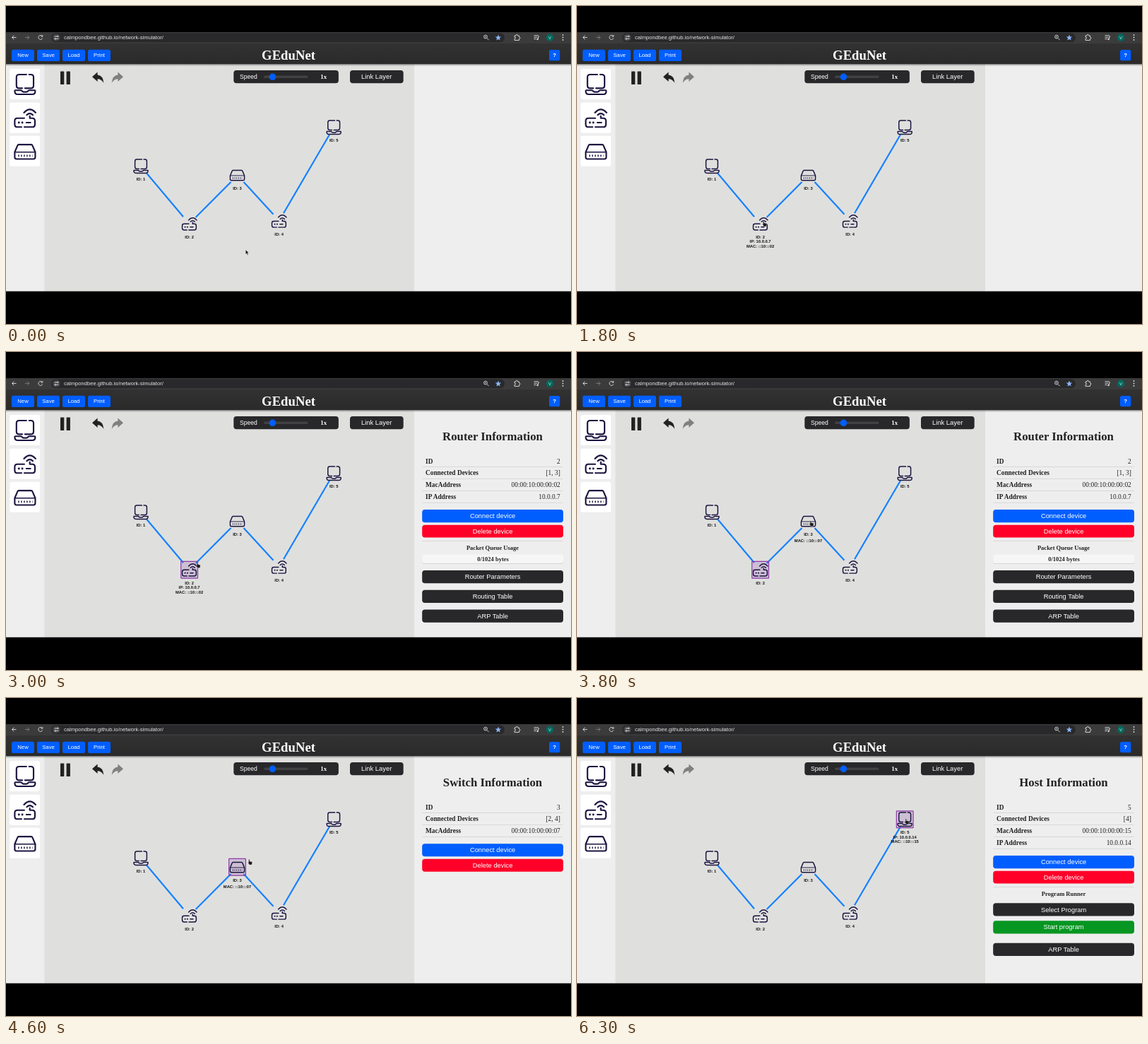
Animation of 800x450 px, one loop 7700 ms. Source, as an HTML page:

```html
<!DOCTYPE html>
<html lang="en">
<head>
<meta charset="utf-8">
<title>Network simulator</title>
<style>
html, body { margin: 0; width: 100%; height: 100%; overflow: hidden; background: #000; }
svg { display: block; width: 800px; height: 450px; }
text { white-space: pre; }
.sans { font-family: "Liberation Sans", Arial, sans-serif; }
.serif { font-family: "Liberation Serif", "Times New Roman", serif; }
.b { font-weight: bold; }
.icon { fill: none; stroke: #1b143f; stroke-width: 2.2; stroke-linecap: round; stroke-linejoin: round; }
.chrome { fill: none; stroke: #d0d1d3; stroke-width: 1; }
</style>
</head>
<body>
<svg id="stage" viewBox="0 0 800 450" xmlns="http://www.w3.org/2000/svg"></svg>
<script>
const LOOP = 7700, STEP = 100;
const BLUE = '#005eff', RED = '#ff0028', GREEN = '#069622', DARK = '#28282a', INK = '#222';

const rect = (x, y, w, h, fill, r = 0, more = '') =>
  `<rect x="${x}" y="${y}" width="${w}" height="${h}" rx="${r}" fill="${fill}" ${more}/>`;
// Text placed by its vertical middle.
const text = (s, x, y, size, fill, cls = 'sans', anchor = 'middle') =>
  `<text x="${x}" y="${y + size * 0.34}" font-size="${size}" fill="${fill}" class="${cls}" text-anchor="${anchor}">${s}</text>`;
const path = (d, more = '') => `<path d="${d}" ${more}/>`;
const group = (id, body) => `<g id="${id}">${body}</g>`;

// Device icons in a 32 unit box.
const ICONS = {
  pc: path('M18 1.5H7.5Q3.5 1.5 3.5 5.5V17.5Q3.5 21.5 7.5 21.5H12M16 21.5H24.5Q28.5 21.5 28.5 17.5V5.5Q28.5 1.5 24.5 1.5H22') +
      path('M2 24.5H9.5Q11 24.5 11.8 25.7T14 27H18Q19.5 27 20.3 25.7T22.5 24.5H30Q31 24.5 31 25.5Q31 30.5 26.5 30.5H5.5Q1 30.5 1 25.5Q1 24.5 2 24.5Z'),
  router: path('M15 16H5Q1 16 1 20V25Q1 29 5 29H11M15 29H26.5Q30.5 29 30.5 25V20Q30.5 16 26.5 16H23V13') +
      path('M7 22.5h.1M12 22.5h.1', 'stroke-width="3"') + path('M18 22.5H24') +
      path('M18.5 11.5Q23 7 27.5 11.5M14.5 8Q23 -1.5 31.5 8'),
  switch: path('M7 6H25Q26.5 6 27 7.5L31 17V24.5Q31 27 28.5 27H3.5Q1 27 1 24.5V17L5 7.5Q5.5 6 7 6Z') +
      path('M1.5 17H30.5', 'stroke-width="1.4"') +
      path('M6 22.3H27', 'stroke-width="3" stroke-dasharray="1.5 2.6" stroke-linecap="butt"')
};
const icon = (kind, cx, cy, size) =>
  `<g class="icon" transform="translate(${cx - size / 2} ${cy - size / 2}) scale(${size / 32})">${ICONS[kind]}</g>`;

const DEVICES = [
  { id: 1, kind: 'pc', x: 191, y: 226.7 },
  { id: 2, kind: 'router', x: 259.6, y: 308.3, info: [[6.4, 'IP: 10.0.0.7'], [12.8, 'MAC: ::10:::02']] },
  { id: 3, kind: 'switch', x: 327.5, y: 239.3, info: [[9.5, 'MAC: ::10:::07']] },
  { id: 4, kind: 'router', x: 386.6, y: 304.4 },
  { id: 5, kind: 'pc', x: 464.2, y: 171.8, info: [[6.4, 'IP: 10.0.0.14'], [12.8, 'MAC: ::10:::15']] }
];

function browserBar() {
  const dots = [41, 44.5, 48].map(y => `<circle cx="788.5" cy="${y}" r=".9" fill="#ddd"/>`).join('');
  return rect(0, 37, 800, 16, '#3b3b3c') + rect(64, 38.3, 642, 13, '#29292b', 6.5) +
    `<circle cx="71.3" cy="44.6" r="5.4" fill="#3f4042"/>` +
    `<g class="chrome">` +
    path('M14.5 44.5H8.5M11.3 41.7L8.5 44.5L11.3 47.3') +
    path('M27 44.5H33M30.2 41.7L33 44.5L30.2 47.3', 'stroke="#77787a"') +
    path('M51.2 42.5A3 3 0 1 0 51.7 45.5M51.8 41V43.2H49.4') +
    path('M68.5 43H72M68.5 46.4H69.5M71 46.4H74.5') +
    `<circle cx="73.2" cy="43" r="1"/><circle cx="69.8" cy="46.4" r="1"/>` +
    `<circle cx="679" cy="43.6" r="2.4"/>` + path('M681 45.6L683.6 48.2M678 43.6H680') +
    path('M720 42H722Q722 40.3 723.3 40.3T724.6 42H726.5V44Q728 44 728 45.2T726.5 46.4V48.5H720V46.3Q721.6 46.3 721.6 45.2T720 44Z') +
    path('M747.5 41.8H754M747.5 44.2H752M747.5 46.6H750.5M753.5 47V43.3H755.3') +
    `</g><circle cx="752.6" cy="47" r="1.2" fill="#d0d1d3"/>` +
    path('M697 40.6L698.2 43.4L701.2 43.6L698.9 45.6L699.6 48.5L697 46.9L694.4 48.5L695.1 45.6L692.8 43.6L695.8 43.4Z', 'fill="#8ab4f8"') +
    `<circle cx="770" cy="44.5" r="5.2" fill="#00695c"/>` + text('V', 770, 44.6, 5.8, '#e4efec') + dots +
    text('calmpondbee.github.io/network-simulator/', 82, 44.6, 7.62, '#e3e3e4', 'sans', 'start');
}

function header() {
  const buttons = ['New', 'Save', 'Load', 'Print'].map((s, i) =>
    rect(8 + 36 * i, 61.7, 32, 16.3, BLUE, 2.6) + text(s, 24 + 36 * i, 69.7, 7.75, '#fff')).join('');
  return rect(0, 53, 800, 29.3, 'url(#head)') + rect(0, 82.3, 800, 3, 'url(#shade)') + buttons +
    text('GEduNet', 400, 69.7, 18.7, '#fff', 'serif b') +
    rect(769, 62, 15.3, 15.3, BLUE, 2.6) + text('?', 776.6, 69.8, 7.75, '#fff', 'sans b');
}

function sidebar() {
  return rect(0, 82, 54.3, 321.7, '#eee') +
    [['pc', 89], ['router', 136.7], ['switch', 183.8]].map(([kind, y]) =>
      rect(5.2, y, 42.9, 43, '#fff', 2.5) + icon(kind, 26.9, y + 22, 31)).join('');
}

function toolbar() {
  const arrow = 'M122 100.2L129.6 93.6V97.6Q137.3 98.2 138.4 109Q135 103.2 129.6 103.2V107Z';
  return rect(77, 92.6, 5.3, 18.4, INK, .6) + rect(85.6, 92.6, 5.3, 18.4, INK, .6) +
    path(arrow, `fill="${INK}"`) + path(arrow, 'fill="#808080" transform="translate(288 0) scale(-1 1)"') +
    rect(322.3, 91, 148.6, 18.2, DARK, 4) + text('Speed', 331, 99.9, 8.6, '#fff', 'sans', 'start') +
    rect(365, 98.6, 62.5, 3.4, '#414143', 1.7) + `<circle cx="377.4" cy="100.3" r="4.8" fill="${BLUE}"/>` +
    text('1x', 449.7, 99.9, 8.8, '#fff', 'serif b') +
    rect(487, 91, 75.7, 18.2, DARK, 4) + text('Link Layer', 524.7, 100, 9.4, '#fff');
}

function network() {
  const links = path('M199 236.5L251 298.3M268.6 299L318.5 249M336.5 249L378.5 294.7M393 293.2L458 182',
    'stroke="#1681ff" stroke-width="2.2" fill="none"');
  return links + DEVICES.map(({ id, kind, x, y, info = [] }) => {
    const label = (dy, s) => text(s, x, y + 18.5 + dy, 5.8, '#111', 'sans b');
    return group('pick' + id, rect(x - 11.9, y - 11.9, 23.8, 23.8, '#8a4bb0', .5,
      'fill-opacity=".22" stroke="#8e3ca6" stroke-width="1.2"')) +
      icon(kind, x, y, 21.5) + label(0, 'ID: ' + id) +
      group('tip' + id, info.map(([dy, s]) => label(dy, s)).join(''));
  }).join('');
}

const wide = (s, y, fill, h = 18.2) => rect(589.2, y, 199.8, h, fill, 4) + text(s, 689.1, y + h / 2, 9.33, '#fff');
const rule = y => rect(589.5, y, 199, .7, '#cfcfcf');

function panel(id, name, values, extra = '') {
  const keys = ['ID', 'Connected Devices', 'MacAddress', 'IP Address'];
  const rows = values.map((v, i) => {
    const y = 154.4 + 16.85 * i;
    return text(keys[i], 594, y, 9.35, INK, 'serif b', 'start') + text(v, 784.8, y, 9.4, INK, 'serif', 'end') + rule(y + 7.9);
  }).join('');
  const top = 155.6 + 16.85 * values.length;
  return group('panel' + id, text(name + ' Information', 689, 119.6, 16.8, INK, 'serif b') + rows +
    wide('Connect device', top, BLUE) + wide('Delete device', top + 21.7, RED, 17.9) + extra);
}

const caption = s => rule(267.3) + text(s, 689, 276.9, 8.5, INK, 'serif b');

function panels() {
  return rect(578, 82, 222, 321.7, '#eee') +
    panel(2, 'Router', ['2', '[1, 3]', '00:00:10:00:00:02', '10.0.0.7'],
      caption('Packet Queue Usage') +
      rect(589.2, 287.4, 199.8, 12.6, '#d4d4d4', 3) + rect(589.2, 286.6, 199.8, 12.4, '#f6f6f6', 3) +
      text('0/1024 bytes', 689.5, 292.9, 8.5, INK, 'serif b') +
      wide('Router Parameters', 309, DARK) + wide('Routing Table', 336.8, DARK) + wide('ARP Table', 364.5, DARK)) +
    panel(3, 'Switch', ['3', '[2, 4]', '00:00:10:00:00:07']) +
    panel(5, 'Host', ['5', '[4]', '00:00:10:00:00:15', '10.0.0.14'],
      caption('Program Runner') +
      wide('Select Program', 290.3, DARK) + wide('Start program', 315.2, GREEN) + wide('ARP Table', 346.7, DARK));
}

const gradient = (id, a, b) => `<linearGradient id="${id}" x2="0" y2="1"><stop stop-color="${a}"/><stop offset="1" stop-color="${b}"/></linearGradient>`;

document.getElementById('stage').innerHTML =
  `<defs>${gradient('head', '#323233', '#2a2a2b')}${gradient('shade', '#0005', '#0000')}</defs>` +
  rect(0, 0, 800, 450, '#000') + rect(54, 82, 524, 321.7, '#dfe0de') +
  sidebar() + panels() + browserBar() + header() + toolbar() + network() +
  group('arrow', path('M0 0V6.3L1.5 5L2.6 7.5L3.7 7L2.6 4.6H4.6Z', 'fill="#111" stroke="#eee" stroke-width=".4"')) +
  group('hand', path('M-.4 .3Q.4 -.6 1 .3V2.5L4 3.2Q4.8 3.6 4.6 4.6L4 7.5H.6L-1.3 4.6Q-1.2 3.6 -.4 4.2Z',
    'fill="#1a1a1a" stroke="#ddd" stroke-width=".4"'));

// Pointer moves: begin, end, x, y of the point reached.
const HOME = [339.3, 345];
const MOVES = [
  [1200, 1700, 264, 304.5],
  [2900, 3600, 330.5, 239],
  [4500, 4600, 344, 228.5],
  [4600, 5200, 465.5, 171]
];
// Time of the click and the device it selects.
const CLICKS = [[1900, 2], [3900, 3], [5900, 5]];

// Halfway between linear and smoothstep.
const ease = k => (k + k * k * (3 - 2 * k)) / 2;

function pointer(t) {
  return MOVES.reduce(([px, py], [begin, end, x, y]) => {
    const k = ease(Math.min(1, Math.max(0, (t - begin) / (end - begin))));
    return [px + (x - px) * k, py + (y - py) * k];
  }, HOME);
}

const el = id => document.getElementById(id);
const show = (id, on) => { const e = el(id); if (e) e.style.display = on ? '' : 'none'; };

function draw(time) {
  const t = Math.floor((time % LOOP) / STEP) * STEP;
  const [x, y] = pointer(t);
  const picked = CLICKS.reduce((id, [at, next]) => t >= at ? next : id, 0);
  let over = false;
  for (const d of DEVICES) {
    const near = Math.hypot(d.x - x, d.y - y) < 20;
    over = over || near;
    show('tip' + d.id, near);
    show('pick' + d.id, picked === d.id);
    show('panel' + d.id, picked === d.id);
  }
  show('arrow', !over);
  show('hand', over);
  el(over ? 'hand' : 'arrow').setAttribute('transform', `translate(${x} ${y})`);
}

const start = performance.now();
function tick() {
  draw(performance.now() - start);
  requestAnimationFrame(tick);
}
tick();
</script>
</body>
</html>
```
